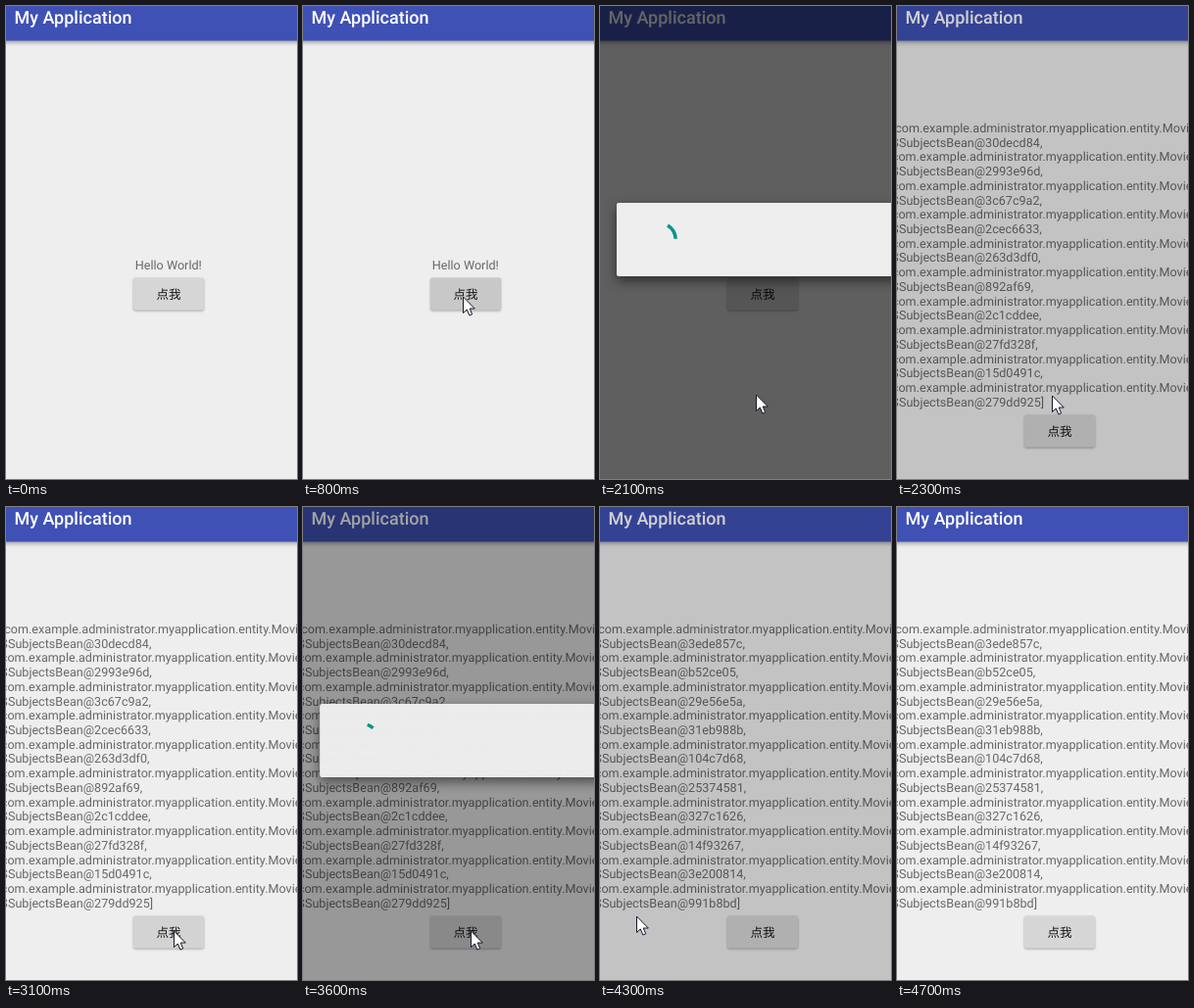
An HTML page for the animation above (5200 ms loop, 297 px wide and 483 px high).

```html
<!DOCTYPE html>
<html lang="zh">
<head>
<meta charset="utf-8">
<title>My Application</title>
<style>
  html, body { margin: 0; width: 100%; height: 100%; overflow: hidden; background: #eee; }
  svg { display: block; width: 297px; height: 483px; }
  text { font-family: Roboto, sans-serif; font-size: 12.62px; fill: #686868; text-rendering: geometricPrecision; }
  .title { font-size: 18px; font-weight: 500; fill: #fff; }
  .label { font-family: "Noto Sans CJK SC", "Noto Sans CJK", sans-serif; font-size: 12.6px; font-weight: 500; fill: #141414; text-anchor: middle; }
  .bar { filter: drop-shadow(0 2px 2px rgba(0, 0, 0, .32)); }
  .face { filter: drop-shadow(0 1px 1px rgba(0, 0, 0, .3)); }
  .sheet { filter: drop-shadow(0 5px 6px rgba(0, 0, 0, .5)); }
</style>
</head>
<body>
<svg viewBox="0 0 297 483">
  <rect width="297" height="483" fill="#eee"/>
  <rect class="bar" x="-10" y="-20" width="317" height="55.5" fill="#3f51b5"/>
  <text class="title" x="8.5" y="18">My Application</text>

  <text id="hello" x="131.8" y="269">Hello World!</text>
  <g id="listA"></g>
  <g id="listB"></g>

  <g id="button">
    <rect class="face" x="130" y="277.5" width="72" height="33" rx="2" fill="#d6d6d6"/>
    <rect id="ripple" x="130" y="277.5" width="72" height="33" rx="2"/>
    <text class="label" x="166" y="298.8">点我</text>
  </g>

  <rect id="dim" width="297" height="483"/>
  <g id="dialog">
    <rect class="sheet" x="17" y="201" width="298" height="75" rx="2" fill="#eee"/>
    <path id="spinner" fill="none" stroke="#009688" stroke-width="3.6"/>
  </g>
  <path id="cursor" d="M0 0V16.5L3.8 13L6.4 19L9.2 17.8L6.7 12H11.8Z" fill="#fff" stroke="#15152a" stroke-linejoin="round"/>
</svg>
<script>
const LOOP = 5200, STEP = 100;
const $ = id => document.getElementById(id);
const set = (id, name, value) => $(id).setAttribute(name, value);
const show = (id, on) => set(id, 'visibility', on ? 'visible' : 'hidden');
const clamp = v => Math.min(1, Math.max(0, v));
const mix = (a, b, k) => a + (b - a) * k;

function fillList(id, hashes) {
  const lines = hashes.split(' ').flatMap((hash, i, all) => [
    (i ? '' : '[') + 'com.example.administrator.myapplication.entity.Movie',
    '$SubjectsBean@' + hash + (i < all.length - 1 ? ',' : ']')
  ]);
  $(id).innerHTML = lines.map((line, i) =>
    `<text x="-5.2" y="${128.8 + i * 14.74}">${line}</text>`).join('');
}
fillList('listA', '30decd84 2993e96d 3c67c9a2 2cec6633 263d3df0 892af69 2c1cddee 27fd328f 15d0491c 279dd925');
fillList('listB', '3ede857c b52ce05 29e56e5a 31eb988b 104c7d68 25374581 327c1626 14f93267 3e200814 991b8bd');

const requests = [{ open: 1090, close: 2300 }, { open: 3490, close: 4300 }];

// Pointer strokes: a straight or bent move from one resting place to the next
const strokes = [
  { start: 100, end: 600, from: [273, 157], via: [255, 440], to: [163, 296] },
  { start: 1600, end: 2000, from: [163, 296], via: [161, 346], to: [159, 396] },
  { start: 2300, end: 3100, from: [158, 397], via: [225, 320], to: [171, 432] },
  { start: 3800, end: 4400, from: [171, 432], via: [87, 440], to: [11, 407] }
];

function pointerAt(t) {
  const { start, end, from, via, to } = strokes.findLast(s => t >= s.start) || strokes[0];
  const k = clamp((t - start) / (end - start));
  return from.map((v, i) => mix(mix(v, via[i], k), mix(via[i], to[i], k), k));
}

// The backdrop fades over 200 ms each way
const dimAt = t => Math.max(...requests.map(({ open, close }) =>
  .6 * Math.min(clamp((t - open + 10) / 200), clamp((close + 60 - t) / 200))));

// The touch ripple swells and fades just before its dialog opens
const rippleAt = t => Math.max(...requests.map(({ open }) =>
  .11 * clamp(1.2 - Math.abs(t - open + 170) / 200)));

// Standard ease: cubic (.4, 0) (.2, 1), solved for x by bisection
function ease(x) {
  const cubic = (a, b, s) => 3 * a * s * (1 - s) ** 2 + 3 * b * s * s * (1 - s) + s ** 3;
  let lo = 0, hi = 1;
  for (let i = 0; i < 24; i++) {
    const mid = (lo + hi) / 2;
    if (cubic(.4, .2, mid) < x) lo = mid; else hi = mid;
  }
  return cubic(0, 1, lo);
}

function spinnerPath(age) {
  const p = age / 1333 % 1, radius = 17.2;
  const head = 270 * ease(clamp(p * 2));
  const tail = 270 * ease(clamp(p * 2 - 1));
  const turn = 90 * p + age * 720 / 6665;
  const point = deg => {
    const a = deg * Math.PI / 180;
    return `${60 + radius * Math.sin(a)} ${238.6 - radius * Math.cos(a)}`;
  };
  return `M${point(turn + tail)}A${radius} ${radius} 0 ${+(head - tail > 180)} 1 ${point(turn + head)}`;
}

function draw(t) {
  show('hello', t < 2200);
  show('listA', t >= 2200 && t < 4200);
  show('listB', t >= 4200);
  set('button', 'transform', `translate(0 ${t < 2200 ? 0 : 140})`);
  set('ripple', 'opacity', rippleAt(t));
  set('dim', 'opacity', dimAt(t));

  const request = requests.find(({ open, close }) => t >= open && t < close);
  show('dialog', request);
  if (request) {
    const age = t - request.open, shown = clamp(age / 112);
    set('dialog', 'opacity', shown);
    set('dialog', 'transform', `translate(166 238.5) scale(${mix(.92, 1, Math.sqrt(shown))}) translate(-166 -238.5)`);
    set('spinner', 'd', spinnerPath(age));
  }

  const [x, y] = pointerAt(t).map(Math.round);
  show('cursor', t >= 100 && t < 4500);
  set('cursor', 'transform', `translate(${x + .5} ${y + 1})`);
}

const start = performance.now();
function tick() {
  const t = (performance.now() - start) % LOOP;
  draw(Math.floor(t / STEP) * STEP);
  requestAnimationFrame(tick);
}
tick();
</script>
</body>
</html>
```
